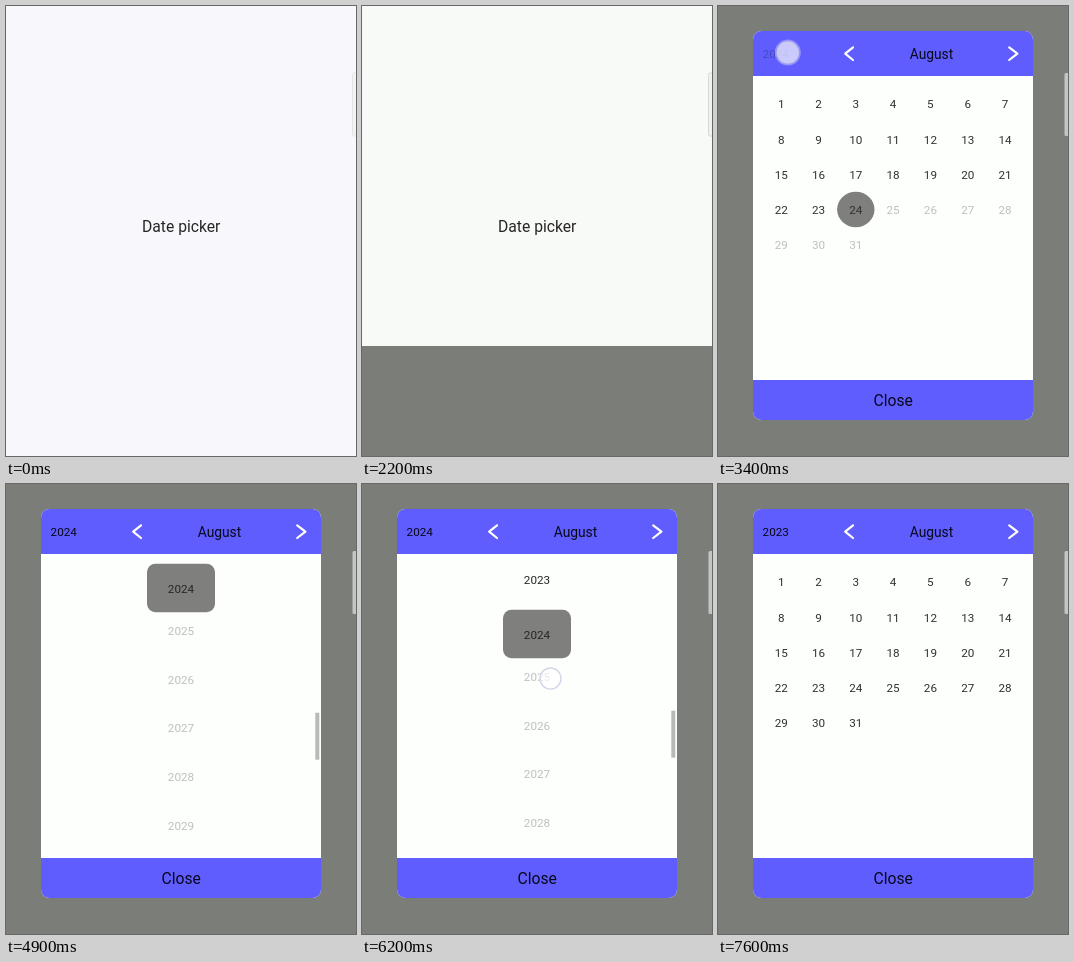
These frames come from a looping animation (350 px wide and 450 px high, 8000 ms). An HTML page:

```html
<!DOCTYPE html>
<html lang="en">
<head>
<meta charset="utf-8">
<title>Date picker</title>
<style>
html, body { margin: 0; width: 100%; height: 100%; overflow: hidden; background: #f8f7fb; }
svg { display: block; width: 100vw; height: 100vh; }
text { font-family: Roboto, sans-serif; font-size: 11.7px; fill: #262626; text-anchor: middle; }
.big { font-size: 15.7px; }
.bar { fill: #5f5dfd; }
.chevron { fill: none; stroke: #fff; stroke-width: 2.2; stroke-linecap: round; stroke-linejoin: round; }
</style>
</head>
<body>
<svg viewBox="0 0 350 450">
  <defs>
    <clipPath id="cardClip"><rect x="35" y="25" width="280" height="389" rx="8.5"/></clipPath>
    <clipPath id="bodyClip"><rect x="35" y="70" width="280" height="304"/></clipPath>
  </defs>
  <rect id="page" width="350" height="450"/>
  <text class="big" id="open" x="175.2" y="225.7">Date picker</text>
  <rect id="backdrop" width="350" height="450" fill="#7b7d79"/>
  <rect id="edge" x="346.5" y="67" width="5" height="63" rx="1.5"/>
  <g id="card">
    <g clip-path="url(#cardClip)">
      <rect x="35" y="25" width="280" height="389" fill="#fdfffd"/>
      <rect class="bar" x="35" y="25" width="280" height="45"/>
      <rect class="bar" x="35" y="374" width="280" height="40"/>
    </g>
    <text id="year" x="44.6" y="52.2" style="text-anchor:start;fill:#08081c"></text>
    <path class="chevron" d="M135 41.3L127.2 47.6L135 54"/>
    <text x="213.5" y="52.8" style="font-size:13.8px;fill:#08081c">August</text>
    <path class="chevron" d="M291.2 41.3L299.4 47.6L291.2 54"/>
    <text class="big" x="175.2" y="399.7" style="fill:#08081c">Close</text>
    <g id="days"><ellipse id="today" cx="137.8" cy="203.5" rx="18.7" ry="17.8" fill="#7f807d"/></g>
    <g clip-path="url(#bodyClip)">
      <g id="years"><rect x="141" y="79.8" width="68" height="48.4" rx="8.5" fill="#7f807d"/></g>
    </g>
    <rect id="thumb" x="309.3" width="4" height="47" fill="#b9bab8"/>
  </g>
  <g id="touch">
    <circle r="13" fill="#fff" fill-opacity=".35"/>
    <circle r="10.5" fill="#fff" fill-opacity=".5" stroke="#cdd0e4" stroke-opacity=".85" stroke-width="1.5"/>
  </g>
</svg>
<script>
const LOOP = 8000, STEP = 100, THIS_YEAR = 2024, ROW = 48.6;
const $ = id => document.getElementById(id);
const set = (el, attrs) => { for (const k in attrs) el.setAttribute(k, attrs[k]); };
const show = (el, on) => set(el, { visibility: on ? "visible" : "hidden" });

function label(parent, x, y, value) {
  const el = document.createElementNS("http://www.w3.org/2000/svg", "text");
  set(el, { x, y });
  el.textContent = value;
  parent.append(el);
  return el;
}

const dayLabels = Array.from({ length: 31 }, (_, i) =>
  label($("days"), 63.2 + (i % 7) * 37.3, 102.2 + Math.floor(i / 7) * 35.3, i + 1));

const yearLabels = {};
for (let y = 2018; y <= 2031; y++) {
  const lift = y === THIS_YEAR ? 0 : 6.4;
  const el = yearLabels[y] = label($("years"), 175, 109 - lift + (y - THIS_YEAR) * ROW, y);
  if (y > THIS_YEAR) el.style.fill = "#bfbfbf";
}

// Linear interpolation through [time, value] pairs, held at both ends.
function track(t, keys) {
  if (t <= keys[0][0]) return keys[0][1];
  for (let i = 1; i < keys.length; i++) {
    const [t0, v0] = keys[i - 1], [t1, v1] = keys[i];
    if (t <= t1) return v0 + (v1 - v0) * (t - t0) / (t1 - t0);
  }
  return keys[keys.length - 1][1];
}

// Label opacity while it is tapped at time `at`.
const pressed = (t, at) =>
  track(t, [[at - STEP, 1], [at, .25], [at + 100, .2], [at + 200, .55], [at + 300, 1]]);

const scrollAt = t => track(t, [[6000, 0], [6100, 8], [6200, 46], [6300, 102], [6400, 142], [6500, 157.5]]);

function touchAt(t) {
  const taps = [[1200, 175, 219.5], [3400, 69.8, 46.6], [7000, 176, 207]];
  for (const [at, x, y] of taps)
    if (t >= at && t < at + 200) return [x, y, 1];
  if (t >= 6000 && t < 6700) return [188.5, 148.5 + scrollAt(t), t < 6600 ? 1 : .5];
  return null;
}

function draw(ms) {
  const t = Math.floor((ms % LOOP) / STEP) * STEP;
  const modal = t >= 2300, list = t >= 4900 && t < 7500, done = t >= 7500;

  set($("page"), { fill: t < 2100 ? "#f8f7fb" : "#f8faf7" });
  set($("open"), { opacity: pressed(t, 1200) });
  set($("backdrop"), { y: track(t, [[2000, 450], [2100, 428], [2200, 340], [2300, 0]]) });
  set($("edge"), modal
    ? { fill: "#c3c5c2", stroke: "none", opacity: 1 }
    : { fill: "#f0f2f0", stroke: "#d6d9d6", opacity: track(t, [[0, .6], [300, 1]]) });

  show($("card"), modal);
  set($("card"), { transform: `translate(0 ${track(t, [[2300, 63], [2400, 12], [2500, 0]])})` });
  $("year").textContent = done ? 2023 : THIS_YEAR;
  set($("year"), { opacity: pressed(t, 3400) });

  set($("days"), { display: list ? "none" : "inline" });
  set($("today"), { display: done ? "none" : "inline" });
  dayLabels.forEach((el, i) => { el.style.fill = i >= 24 && !done ? "#bfbfbf" : "#303030"; });

  const scroll = scrollAt(t);
  set($("years"), { display: list ? "inline" : "none", transform: `translate(0 ${scroll})` });
  set(yearLabels[2023], { opacity: pressed(t, 7000) });
  const fade = t < 6000
    ? track(t, [[5600, 1], [5800, 0]])
    : track(t, [[6800, 1], [7100, 0]]);
  set($("thumb"), { display: list ? "inline" : "none", y: 228.7 - scroll * 7 / 157.5, opacity: fade });

  const touch = touchAt(t);
  show($("touch"), touch);
  if (touch) set($("touch"), { transform: `translate(${touch[0]} ${touch[1]})`, opacity: touch[2] });
}

const start = performance.now();
function tick() {
  draw(performance.now() - start);
  requestAnimationFrame(tick);
}
tick();
</script>
</body>
</html>
```
